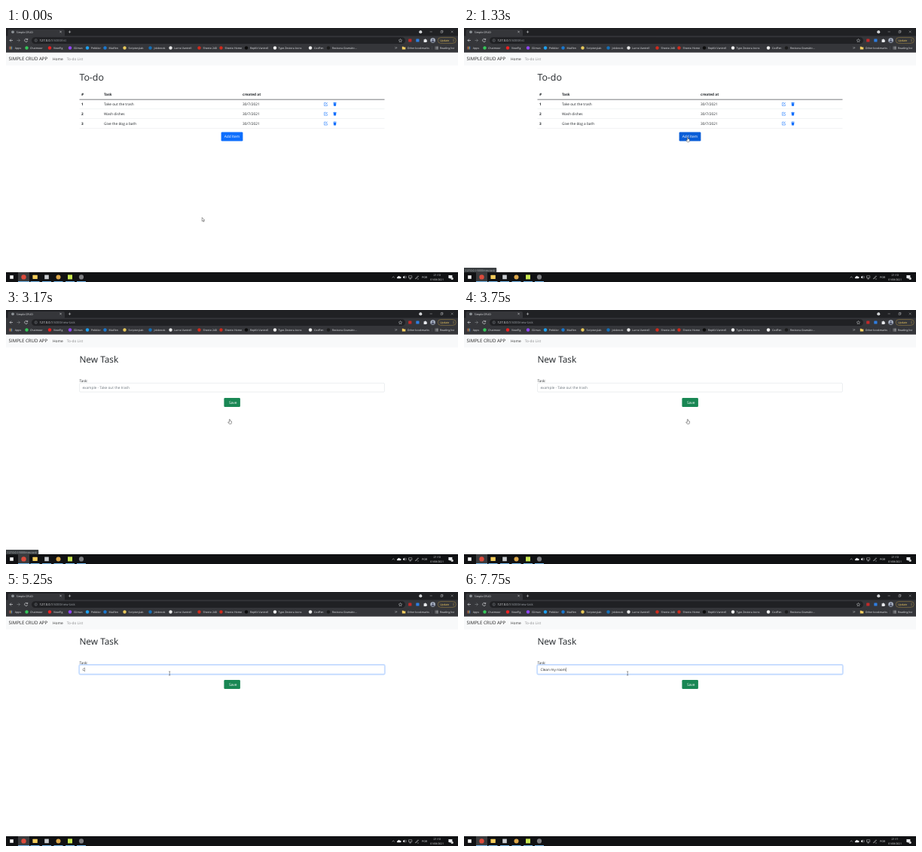
Recreate the animation shown at these times as an HTML page. Size 600 by 338 pixels, loop 8000 ms.

```html
<!DOCTYPE html>
<html lang="en">
<head>
<meta charset="utf-8">
<title>Simple CRUD</title>
<style>
html, body { margin: 0; width: 100%; height: 100%; overflow: hidden; background: #fff; }
svg { display: block; width: 600px; height: 338px; }
text { font-family: "Open Sans", "Noto Sans", sans-serif; text-rendering: geometricPrecision; white-space: pre; }
</style>
</head>
<body>
<svg id="stage" viewBox="0 0 600 338" xmlns="http://www.w3.org/2000/svg"></svg>
<script>
const LOOP = 8000;
const INK = '#212529', PALE = '#e8eaed', GREY = '#9aa0a6', BLUE = '#0d6efd';

// y is the middle of the capitals
const text = (x, y, str, size, fill, more = '') =>
  `<text x="${x}" y="${y + size * .357}" font-size="${size}" fill="${fill}" ${more}>${str}</text>`;
const rect = (x, y, w, h, fill, r = 0, more = '') =>
  `<rect x="${x}" y="${y}" width="${w}" height="${h}" rx="${r}" fill="${fill}" ${more}/>`;
const dot = (x, y, r, fill, more = '') => `<circle cx="${x}" cy="${y}" r="${r}" fill="${fill}" ${more}/>`;
const line = (d, color, w = .5, more = '') =>
  `<path d="${d}" fill="none" stroke="${color}" stroke-width="${w}" ${more}/>`;
const group = (id, body, more = '') => `<g id="${id}" ${more}>${body}</g>`;
const MID = 'text-anchor="middle"', BOLD = 'font-weight="700"';

function browser() {
  const marks = [
    [27.5, 32, 'Chatmoor', '#35c759'], [58, 63, 'ViewFig', '#f02020'],
    [85, 90, 'Glimvo', '#9146ff'], [108, 113, 'Pebblor', '#1da1f2'],
    [131.5, 136.5, 'Mailfen', '#1a78d0'], [157.5, 162.5, 'Scriptorylab', '#e8c85a'],
    [191.5, 196.5, 'Jobbrook', '#1470b8'], [218.5, 223, 'Lurno Vantrell', '#e8e8e8'],
    [256.5, 261.5, 'Sheeto 240', '#d02a1c'], [285.5, 290.5, 'Sheeto Home', '#d02a1c'],
    [319, 324, 'RepKit Vantrell', '#0c0c0c'], [357, 361.5, 'Type Zestora Icons', '#f0f0f0'],
    [404, 409, 'CodFen', '#f0f0f0'], [428, 433, 'Revisora Gramátic...', '#1c1c1c']
  ];
  let s = rect(0, 0, 600, 11, '#202124') + rect(0, 10.5, 600, 22.3, '#35363a') +
    rect(2.5, 2, 75.5, 10, '#35363a', 2) +
    dot(9, 5.3, 1.9, '#8c9196') + text(13.8, 5.3, 'Simple CRUD', 3.6, PALE) +
    line('M71.4 4l2.2 2.2m0-2.2l-2.2 2.2M82.8 5.2h3.4m-1.7-1.7v3.4', PALE) +
    dot(550.3, 5.2, 2, PALE) + line('M549.3 5l1 .9 1-.9', '#202124', .4) +
    line('M562.6 5h3.2M577 4.2h2.3v2.3h-2.3zM577.7 4.1v-.7h2.3v2.3h-.7M590.8 3.6l2.8 2.8m0-2.8l-2.8 2.8', PALE, .35);

  s += line('M9 16.5H5m1.9-1.9L5 16.5l1.9 1.9', PALE, .6) +
    line('M14.5 16.5h4m-1.9-1.9l1.9 1.9-1.9 1.9', '#85888c', .6) +
    line('M28.3 15.3a2 2 0 1 0 .3 1.7M28.7 13.9v1.7H27', PALE, .6) +
    rect(34, 12.2, 496, 8.8, '#202124', 4.4) +
    dot(39.7, 16.5, 1.7, 'none', `stroke="${GREY}" stroke-width=".4"`) +
    line('M39.7 16.2v1.3m0-2.2v.4', GREY, .4) +
    `<text x="44.4" y="18" font-size="4.2" fill="${PALE}">127.0.0.1<tspan fill="${GREY}">:5000/<tspan id="path"></tspan></tspan></text>` +
    line('M523.5 14.4l.7 1.5 1.6.2-1.2 1.1.3 1.6-1.4-.8-1.4.8.3-1.6-1.2-1.1 1.6-.2z', PALE, .4) +
    rect(534.2, 14.4, 4.2, 4.2, '#c22a2a', .6) + rect(544.3, 14.4, 4.2, 4.2, '#2f7de0', .6) +
    `<path d="M554.6 15.2h1.2a.8.8 0 0 1 1.6 0h1v1.2a.8.8 0 0 1 0 1.6v1h-3.8z" fill="${PALE}"/>` +
    dot(566.6, 16.5, 3.3, '#aab4c4') + dot(566.6, 15.6, 1.1, '#50556a') +
    '<path d="M564.4 18.9a2.2 2.2 0 0 1 4.4 0z" fill="#50556a"/>' +
    rect(573.3, 12.6, 24, 7.8, '#35363a', 3.9, 'stroke="#c9a548" stroke-width=".4"') +
    text(576, 16.5, 'Update', 3.6, '#fdd663') +
    [15, 16.5, 18].map(y => dot(594, y, .4, '#fdd663')).join('');

  for (let i = 0; i < 9; i++)
    s += rect(4.4 + i % 3 * 1.4, 24.6 + (i / 3 | 0) * 1.4, 1, 1, ['#e8685c', '#e8b83a', '#5a9cf0'][i % 3]);
  s += text(11.8, 26.5, 'Apps', 3.55, PALE);
  for (const [ix, tx, name, color] of marks)
    s += dot(ix, 26.5, 2.2, color) + text(tx, 26.5, name, 3.55, PALE);
  s += line('M516.4 25.3l1.1 1.1-1.1 1.1m1.5-2.2l1.1 1.1-1.1 1.1', PALE, .45) +
    '<path d="M525.8 24.8h1.7l.6.6h2.2v3.2h-4.5z" fill="#f5cf62"/>' +
    text(532.8, 26.5, 'Other bookmarks', 3.55, PALE) + rect(565.4, 24, .3, 5, '#5f6368') +
    line('M569.6 25h1m.6 0h2.6m-4.2 1.5h1m.6 0h2.6m-4.2 1.5h1m.6 0h2.6', PALE, .6) +
    text(576, 26.5, 'Reading list', 3.55, PALE);

  return s + rect(0, 32.8, 600, 17, '#f8f9fa') +
    text(3.6, 41.3, 'SIMPLE CRUD APP', 6.1, '#222') +
    text(62, 41.3, 'Home', 4.85, '#333') + text(80.8, 41.3, 'To-do List', 4.75, '#8a8b8c');
}

function listPage() {
  const tasks = ['Take out the trash', 'Wash dishes', 'Give the dog a bath'];
  let s = text(97.4, 65.5, 'To-do', 12.4, INK, 'font-weight="500"') +
    text(100, 88.7, '#', 4.75, INK, BOLD) + text(130, 88.7, 'Task', 4.75, INK, BOLD) +
    text(314, 88.7, 'created at', 4.75, INK, BOLD) + rect(97.5, 94.8, 405, .6, INK);
  tasks.forEach((task, i) => {
    const y = 101.4 + i * 12.8;
    s += text(100, y, i + 1, 4.75, INK, BOLD) + text(130, y, task, 4.75, INK) +
      text(314, y, '30/7/2021', 4.8, INK) + rect(97.5, y + 6.3, 405, .35, '#d8dce0') +
      `<g transform="translate(424.5 ${y})">` +
      line('M.6-1.9H-2.1V2.1H1.9V0', BLUE, .5) + line('M-.7.7L2-2', BLUE, .8) +
      `</g><path transform="translate(436.5 ${y})" d="M-2.1-2.2h1.4l.3-.3h.8l.3.3h1.4v.8h-4.2zM-1.8-1.1h3.6l-.3 3.5h-3z" fill="${BLUE}"/>`;
  });
  return s + rect(285.6, 138.6, 28.8, 11.9, BLUE, 1.25, 'id="add"') +
    text(300, 144.7, 'Add Item', 4.85, '#fff', MID);
}

const formPage = () =>
  text(97.4, 65.5, 'New Task', 11.9, INK, 'font-weight="500"') +
  text(97.5, 93.9, 'Task:', 4.75, INK) +
  rect(96.9, 96.6, 406.2, 13.2, 'none', 1.8, 'id="glow" stroke="#0d6efd" stroke-opacity=".25" stroke-width="1.25"') +
  rect(97.6, 97.3, 404.8, 11.8, '#fff', 1.2, 'id="field" stroke-width=".4"') +
  text(101.4, 103.4, '', 4.75, INK, 'id="value"') +
  rect(0, 100.6, .4, 5.4, INK, 0, 'id="caret"') +
  rect(289.4, 117.1, 21.5, 11.8, '#198754', 1.25) +
  text(301.2, 123.1, 'Save', 4.85, '#fff', MID);

function taskbar() {
  let s = rect(0, 325, 600, 13, '#101113') + rect(16, 325, 15, 13, '#3a3b3d') +
    rect(5.2, 329.2, 4.6, 4.6, '#f4f4f4') + dot(23.5, 331.4, 3.2, '#dc4b3c') +
    rect(35.4, 328.8, 6.4, 5.2, '#f3cc5c', .4) + rect(51.2, 328.6, 5.6, 5.6, '#c9cccf') +
    dot(69.5, 331.4, 3, '#dba74a') + rect(82, 328.4, 6, 6, '#c8e650') + dot(100, 331.4, 3.1, '#7c7d80');
  for (const x of [16, 32.5, 48, 63.5, 79, 94])
    s += rect(x, 337, x == 16 ? 15 : 12, 1, '#76b9ed');
  return s + line('M512.6 332.4l1.6-1.6 1.6 1.6', PALE) +
    `<path d="M519.6 333.3a1.1 1.1 0 0 1 .2-2.1 1.7 1.7 0 0 1 3.2-.3 1.2 1.2 0 0 1 .6 2.4z" fill="${PALE}"/>` +
    `<path d="M527 330.8h1l1.2-1.2v4l-1.2-1.2h-1z" fill="${PALE}"/>` +
    line('M530 330.5q.7 1.1 0 2.2m.8-2.9q1.2 1.8 0 3.6', PALE, .35) +
    line('M534.5 329.8h4.3v2.8h-4.3zM536.6 332.6v1.4m-1.2 0h2.4M543.3 333.6l3.6-3.8.7.7-3.6 3.5zM546 334h1.8', PALE, .45) +
    text(555.6, 331.7, 'POR', 3.6, PALE, MID) +
    text(572.2, 328.8, '', 3.6, PALE, MID + ' id="clock"') +
    text(572.2, 334.6, '01/08/2021', 3.4, PALE, MID) +
    `<path d="M587.4 329h5v4h-2l-1 1.2v-1.2h-2z" fill="${PALE}"/>` + dot(592.2, 333.4, 1.6, '#d8d8d8');
}

const outline = 'fill="#fff" stroke="#111" stroke-width=".4" stroke-linejoin="round"';
document.getElementById('stage').innerHTML =
  rect(0, 0, 600, 338, '#fff') + browser() +
  group('list', listPage()) + group('form', formPage()) + taskbar() +
  group('status', rect(-1, 319, 44.2, 6.2, '#3c4043', .8) +
    text(1.8, 322.3, '127.0.0.1:5000/new-task', 3.45, '#bdc1c6')) +
  group('cursor',
    `<path id="arrow" d="M0 0V5L1.2 4 2 5.7 2.8 5.4 2.1 3.7H3.6Z" ${outline}/>` +
    `<path id="hand" d="M-.6.4a.6.6 0 0 1 1.2 0V2l2 .5v2.2L2 6H-.6L-2.2 3.8q.2-.7 1-.2l.6.4Z" ${outline}/>` +
    line('M-1-2.6Q0-2.6 0-2Q0-2.6 1-2.6M0-2V2M-1 2.6Q0 2.6 0 2Q0 2.6 1 2.6', '#222', .45, 'id="beam"'));

const $ = id => document.getElementById(id);
const set = (id, name, v) => $(id).setAttribute(name, v);
const show = (id, on) => set(id, 'display', on ? 'inline' : 'none');
const ramp = (t, a, b) => Math.min(1, Math.max(0, (t - a) / (b - a)));
const ease = k => k * k * (3 - 2 * k);
const mix = (a, b, k) => a + (b - a) * k;
const blend = (a, b, k) => `rgb(${a.map((v, i) => Math.round(mix(v, b[i], k)))})`;

const PHRASE = 'Clean my room';
const KEYS = [5250, 5330, 5420, 5580, 5830, 6000, 6170, 6420, 7000, 7330, 7500, 7670, 7750];
const OPEN = 2920, LEAVE = 3920, FOCUS = 4580;

function draw(t) {
  const onForm = t >= OPEN;
  show('list', !onForm);
  show('form', onForm);
  $('path').textContent = onForm ? 'new-task' : 'list';
  $('clock').textContent = t < 7000 ? '21:10' : '21:11';

  set('add', 'fill', blend([13, 110, 253], [11, 94, 215], ramp(t, 780, 930)));
  set('status', 'opacity', ramp(t, 900, 1170) * (1 - ramp(t, 3500, 3750)));

  const go = ease(ramp(t, 80, 830)), back = ease(ramp(t, LEAVE, 4580));
  const x = mix(mix(260.2, 296.9, go), 217.2, back);
  const y = mix(mix(252.2, 145.6, go), 108.3, back);
  set('cursor', 'transform', `translate(${x} ${y})`);
  const hand = t < LEAVE && y < 150.5, beam = onForm && y < 109.2;
  show('hand', hand);
  show('beam', beam);
  show('arrow', !hand && !beam);

  const focus = ramp(t, FOCUS, FOCUS + 150);
  set('glow', 'opacity', focus);
  set('field', 'stroke', blend([206, 212, 218], [134, 183, 254], focus));

  const typed = KEYS.filter(k => k <= t).length;
  const value = $('value');
  value.textContent = typed ? PHRASE.slice(0, typed) : 'example - Take out the trash';
  value.setAttribute('fill', typed ? INK : '#6c757d');
  const since = t - (typed ? KEYS[typed - 1] : FOCUS);
  show('caret', since >= 0 && since % 1060 < 530);
  set('caret', 'x', 101.4 + (typed && onForm ? value.getComputedTextLength() : 0));
}

const start = performance.now();
function tick() {
  draw((performance.now() - start) % LOOP);
  requestAnimationFrame(tick);
}
tick();
</script>
</body>
</html>
```
